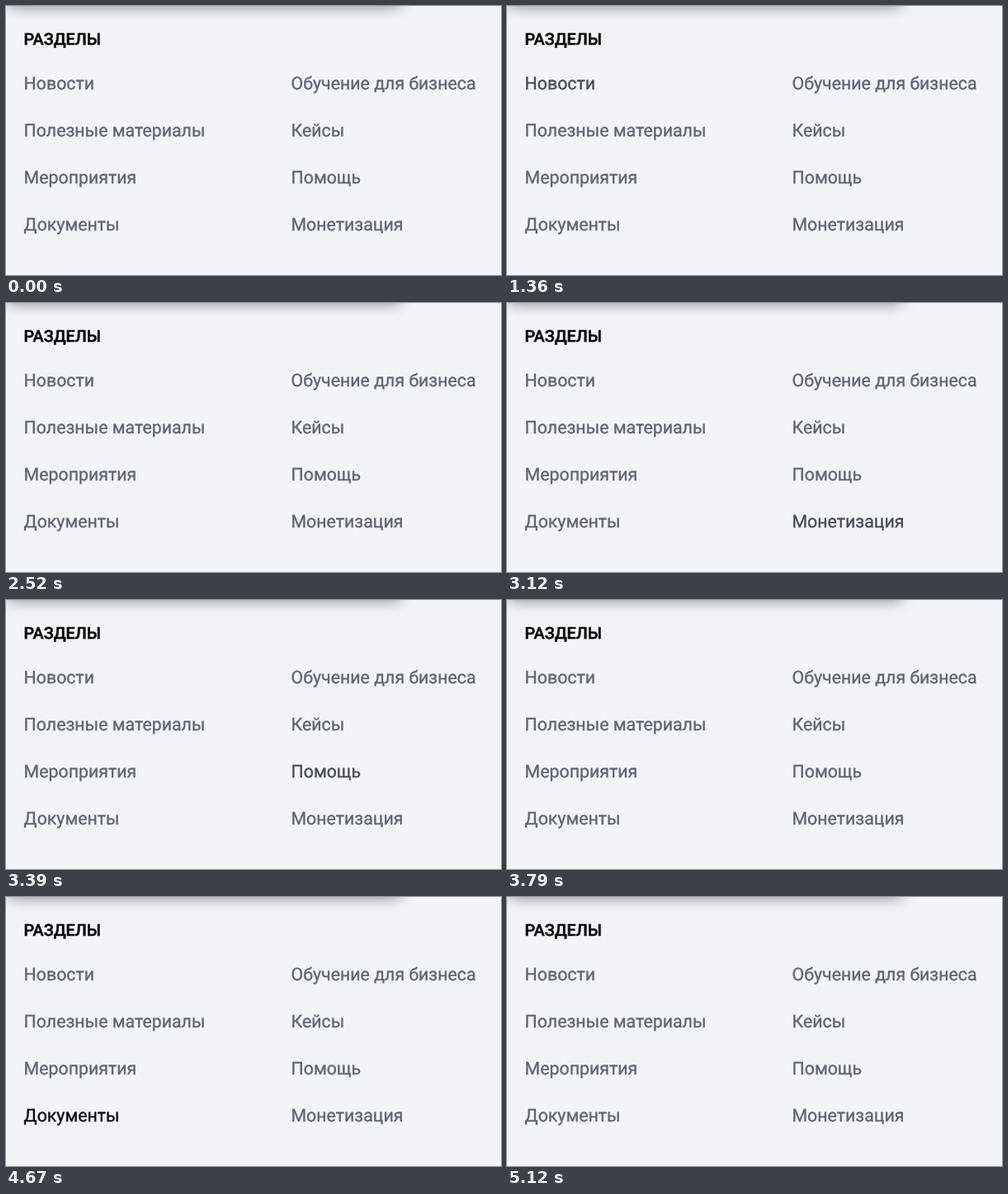
Write an HTML page that moves like this. It is 600 px wide and 326 px high and loops after 5.97 s.

```html
<!DOCTYPE html>
<html lang="ru">
<head>
<meta charset="utf-8">
<title>Разделы</title>
<style>
  html, body { margin: 0; width: 100%; height: 100%; overflow: hidden; background: #f3f4f8; }
  svg { display: block; width: 600px; height: 326px; }
  text {
    font-family: Roboto, sans-serif;
    font-size: 21.33px;
    text-rendering: geometricPrecision;
    stroke: currentColor;
    stroke-width: .35px;
    fill: currentColor;
  }
  .title { font-size: 19.8px; font-weight: 500; color: #050608; stroke-width: .45px; }
</style>
</head>
<body>
<svg id="stage" viewBox="0 0 600 326">
  <defs>
    <filter id="soft" filterUnits="userSpaceOnUse" x="-60" y="-110" width="640" height="180">
      <feGaussianBlur stdDeviation="9"/>
    </filter>
  </defs>
  <rect width="600" height="326" fill="#f3f4f8"/>
  <rect x="0" y="-70" width="480" height="71" rx="10" opacity=".44" filter="url(#soft)"/>
  <text class="title" x="21.6" y="46.6">РАЗДЕЛЫ</text>
</svg>
<script>
const LOOP = 5970, FADE = 160;
const IDLE = [93, 101, 116], HOVER = [8, 9, 12];
const TOP = 100.7, PITCH = 57;

// Each visit: [pointer enters, pointer leaves]
const columns = [
  { x: 21.6, links: [
    ['Новости', [[1360, 1910]]],
    ['Полезные материалы', [[2120, 2260], [5040, 5120]]],
    ['Мероприятия', [[2390, 2520], [4930, 4990]]],
    ['Документы', [[2670, 2790], [4550, 4880]]]
  ] },
  { x: 345.5, links: [
    ['Обучение для бизнеса', [[3590, 3730]]],
    ['Кейсы', [[3490, 3560], [3820, 3910]]],
    ['Помощь', [[3390, 3460], [3990, 4120]]],
    ['Монетизация', [[3120, 3260], [4270, 4480]]]
  ] }
];

const stage = document.getElementById('stage');

function addText(x, y, label) {
  const node = document.createElementNS('http://www.w3.org/2000/svg', 'text');
  node.setAttribute('x', x);
  node.setAttribute('y', y);
  node.textContent = label;
  return stage.appendChild(node);
}

const items = columns.flatMap(({ x, links }) =>
  links.map(([label, visits], row) => ({ node: addText(x, TOP + row * PITCH, label), visits })));

// CSS "ease": cubic-bezier(.25, .1, .25, 1)
function ease(p) {
  if (p >= 1) return 1;
  const curve = (s, a, b) => 3 * a * s * (1 - s) ** 2 + 3 * b * s * s * (1 - s) + s ** 3;
  let lo = 0, hi = 1;
  for (let i = 0; i < 20; i++) {
    const mid = (lo + hi) / 2;
    if (curve(mid, .25, .25) < p) lo = mid; else hi = mid;
  }
  return curve(lo, .1, 1);
}

// The fade is already under way when it first shows; leaving is instant.
function hoverAmount(visits, t) {
  const visit = visits.find(([enter, leave]) => t >= enter && t < leave);
  return visit ? ease((t - visit[0] + 30) / FADE) : 0;
}

function draw(t) {
  for (const { node, visits } of items) {
    const k = hoverAmount(visits, t);
    const rgb = IDLE.map((c, i) => Math.round(c + (HOVER[i] - c) * k));
    node.style.color = `rgb(${rgb})`;
  }
}

const start = performance.now();
function tick() {
  draw((performance.now() - start) % LOOP);
  requestAnimationFrame(tick);
}
tick();
</script>
</body>
</html>
```
